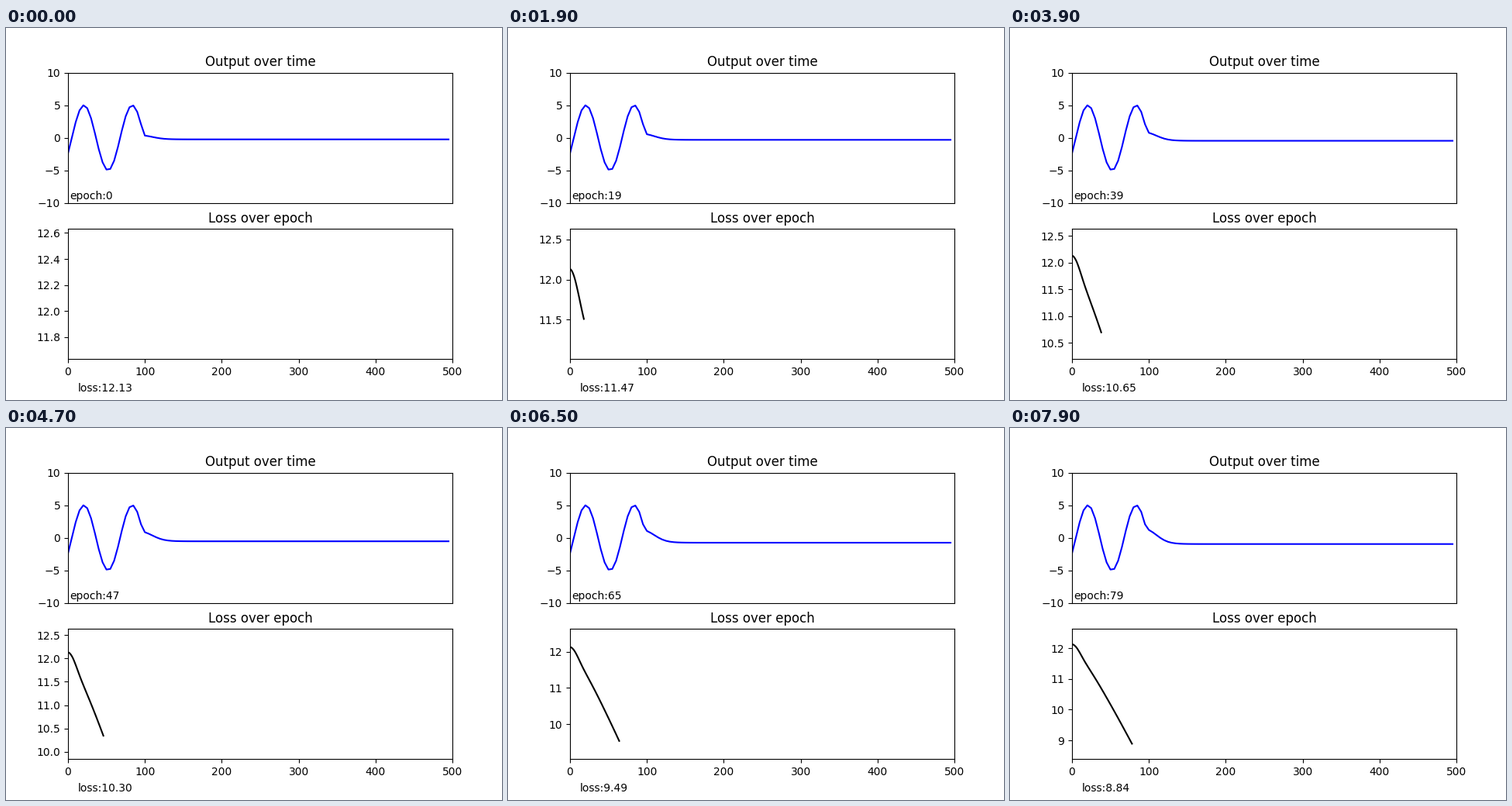
Write a matplotlib script that moves like this. It is 640 px wide and 480 px high and loops after 8 s.

```python
import numpy as np
import matplotlib.pyplot as plt
from matplotlib.animation import FuncAnimation

EPOCHS = 80
W, H = 640, 480
SEED_LEN = 20  # known samples before the prediction starts

plt.rcParams["font.family"] = "DejaVu Sans"


def loss_curve():
    """Loss per epoch, integrated from its rate of descent."""
    knots = [0, 3, 8, 13, 19, 26, 40, 65, 79]
    rates = [0.003, 0.02, 0.041, 0.046, 0.0405, 0.0395, 0.0432, 0.046, 0.0468]
    rate = np.interp(np.arange(EPOCHS), knots, rates)
    steps = (rate[1:] + rate[:-1]) / 2
    return 12.131 - np.concatenate([[0], np.cumsum(steps)])


def output(epoch):
    """A sine wave followed by the network's decaying prediction."""
    wave = 5 * np.sin(x[:SEED_LEN] / 10 - 0.5)
    n = np.arange(len(x) - SEED_LEN)
    first = 0.33 + 0.011 * epoch
    rest = -0.25 - 0.0022 * epoch - 0.000087 * epoch**2
    decay = 1.277 / (1 + 0.277 * np.exp(0.65 * n))
    return np.concatenate([wave, rest + (first - rest) * decay])


def label(px, py):
    return fig.text(px / W, 1 - py / H, "", fontsize=10)


x = np.arange(0, 500, 5)
losses = loss_curve()

fig, (top, bottom) = plt.subplots(2, 1, figsize=(W / 100, H / 100), dpi=100)
top.set(title="Output over time", xlim=(0, 500), ylim=(-10, 10), xticks=[])
bottom.set(title="Loss over epoch", xlim=(0, 500))

out_line, = top.plot([], [], color="blue", lw=1.5)
loss_line, = bottom.plot([], [], color="black", lw=1.5)
epoch_text = label(82, 221)
loss_text = label(93, 469)


def update(epoch):
    out_line.set_data(x, output(epoch))
    loss_line.set_data(np.arange(epoch), losses[:epoch])
    lowest = losses[max(epoch - 1, 0)]
    bottom.set_ylim(lowest - 0.5, losses[0] + 0.5)
    epoch_text.set_text(f"epoch:{epoch}")
    loss_text.set_text(f"loss:{losses[epoch]:.2f}")
    return out_line, loss_line, epoch_text, loss_text


anim = FuncAnimation(fig, update, frames=EPOCHS, interval=100, repeat=True)
plt.show()
```
